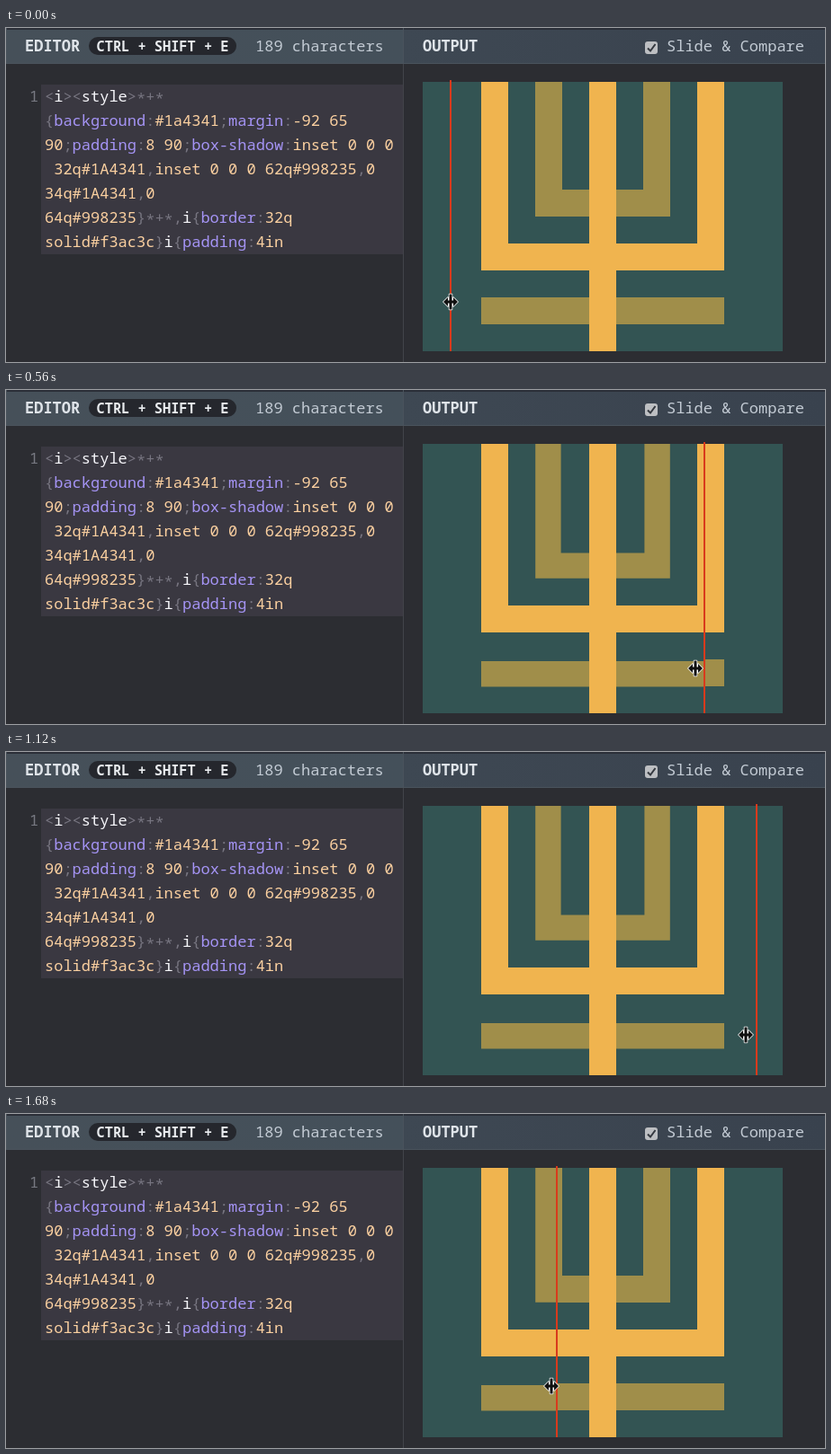
Recreate the animation shown at these times as an HTML page. Size 910x372 px, loop 1.75 s.

```html
<!DOCTYPE html>
<html lang="en">
<head>
<meta charset="utf-8">
<title>Slide and compare</title>
<style>
  html, body { margin: 0; width: 100%; height: 100%; overflow: hidden; background: #2c2d32; }
  body { font: 500 17px/27px "Noto Sans Mono", "Liberation Mono", monospace; color: #c3cbd4; }
  body > * { position: absolute; box-sizing: border-box; margin: 0; white-space: pre; }
  header { top: 0; height: 40px; border: solid #4a535c; border-width: 0 0 1px 1px; box-shadow: inset 0 2px #2b2f38; }
  header > * { position: absolute; top: 6px; }
  #editor { left: 0; width: 442px; background: linear-gradient(90deg, #465059, #44505a); }
  #output { left: 441px; width: 469px; background: linear-gradient(90deg, #3e4853, #39424e); }
  b { color: #dfe4e9; font-weight: 700; }
  kbd { left: 91px; top: 10px; width: 164px; height: 20px; border-radius: 10px; background: #25272d;
        color: #e9ecef; font: 700 15.3px/20px "Noto Sans Mono", "Liberation Mono", monospace; text-align: center; }
  #divider { left: 441px; top: 40px; width: 1px; height: 332px; background: #42444a; }
  #number { left: 26px; top: 62px; color: #777982; }
  pre { left: 39px; top: 63px; width: 402px; height: 189px; padding-left: 4px; background: #3a3841; font: inherit; }
  pre span { position: relative; top: -1px; }
  .prop { color: #a594f5; }
  .tag { color: #f6f6fa; }
  .punct { color: #777580; }
  .value { color: #fbd0a0; }
  pre .star { top: 2px; }
  svg { left: 0; top: 0; }
</style>
</head>
<body>
<header id="editor"><b style="left:20px">EDITOR</b><kbd>CTRL + SHIFT + E</kbd><span style="left:276px">189 characters</span></header>
<header id="output"><b style="left:21px">OUTPUT</b><span style="left:292px">Slide &amp; Compare</span></header>
<div id="divider"></div>
<div id="number">1</div>
<pre></pre>
<svg width="910" height="372">
  <defs>
    <clipPath id="left"><rect x="463" y="60" width="0" height="300"/></clipPath>
    <g id="frame" fill="#f0b44f">
      <path d="M528 60h30v180h210V60h30v210H528zM648 60h30v300h-30z"/>
    </g>
  </defs>
  <rect x="710" y="15" width="14" height="14" rx="3" fill="#bdbfc2"/>
  <path d="M713 22.5l3 3 5.500-7.500" fill="none" stroke="#34383f" stroke-width="2"/>
  <path d="M463 60h400v300H463z" fill="#335453"/>
  <path d="M588 60h30v120h90V60h30v150H588zM528 300h270v30H528z" fill="#a08e4a"/>
  <g clip-path="url(#left)">
    <path d="M463 60h400v300H463z" fill="#335453"/>
    <path d="M588.2 60h28.400v121.400h92.800V60h28.400v149.800H588.2zM528 302.100h270v28.400H528z" fill="#a08e4a"/>
  </g>
  <use href="#frame"/>
  <path id="line" d="M-1 58h2v302h-2z" fill="#d93a1c"/>
  <path id="cursor" d="M-8 0l5-5v3.500h1.500V-8.500h3V-1.500H3V-5l5 5-5 5V1.500H1.500V8.500h-3V1.500H-3V5z"
        fill="#111" stroke="#fff" stroke-width="1.500" stroke-linejoin="round" paint-order="stroke"/>
</svg>
<script>
const code = `<i><style>*+*
{background:#1a4341;margin:-92 65
90;padding:8 90;box-shadow:inset 0 0 0
 32q#1A4341,inset 0 0 0 62q#998235,0
34q#1A4341,0
64q#998235}*+*,i{border:32q
solid#f3ac3c}i{padding:4in`;

const tokens = /(?<prop>[a-z-]+(?=:))|(?<tag>\b(?:i|style)(?=[>{]))|(?<punct>[<>{}:;,*+])|(?<value>[^<>{}:;,*+]+)/g;
for (const { 0: text, groups } of code.matchAll(tokens)) {
  const span = document.createElement("span");
  span.className = Object.keys(groups).find(name => groups[name]);
  if (text === "*") span.classList.add("star");
  span.textContent = text;
  document.querySelector("pre").append(span);
}

// Time, slider x, pointer x, pointer y
const path = [
  [0, 494, 494, 305], [350, 710, 708, 306], [560, 776, 766, 310], [840, 860, 837, 318],
  [1120, 834, 822, 315], [1470, 725, 722, 308], [1680, 612, 606, 303]
];

const slope = (a, b, k) => (b[k] - a[k]) / (b[0] - a[0]);

// Slope at a key, flat where the direction turns
function tangent(i, k) {
  const last = path.length - 1;
  const before = slope(path[Math.max(i - 1, 0)], path[Math.max(i, 1)], k);
  const after = slope(path[Math.min(i, last - 1)], path[Math.min(i + 1, last)], k);
  return before * after <= 0 ? 0 : 2 * before * after / (before + after);
}

function valueAt(t, k) {
  let i = 0;
  while (i < path.length - 2 && t >= path[i + 1][0]) i++;
  const [a, b] = [path[i], path[i + 1]];
  const span = b[0] - a[0], u = (t - a[0]) / span, v = 1 - u;
  return v * v * ((1 + 2 * u) * a[k] + u * span * tangent(i, k))
       + u * u * ((1 + 2 * v) * b[k] - v * span * tangent(i + 1, k));
}

const line = document.getElementById("line");
const cursor = document.getElementById("cursor");
const clip = document.querySelector("#left rect");

function draw(now) {
  const t = Math.floor(now % 1750 / 70) * 70;
  const [x, px, py] = [1, 2, 3].map(k => Math.round(valueAt(t, k)));
  clip.setAttribute("width", x - 463);
  line.setAttribute("transform", `translate(${x})`);
  cursor.setAttribute("transform", `translate(${px} ${py})`);
  requestAnimationFrame(draw);
}
draw(0);
</script>
</body>
</html>
```
